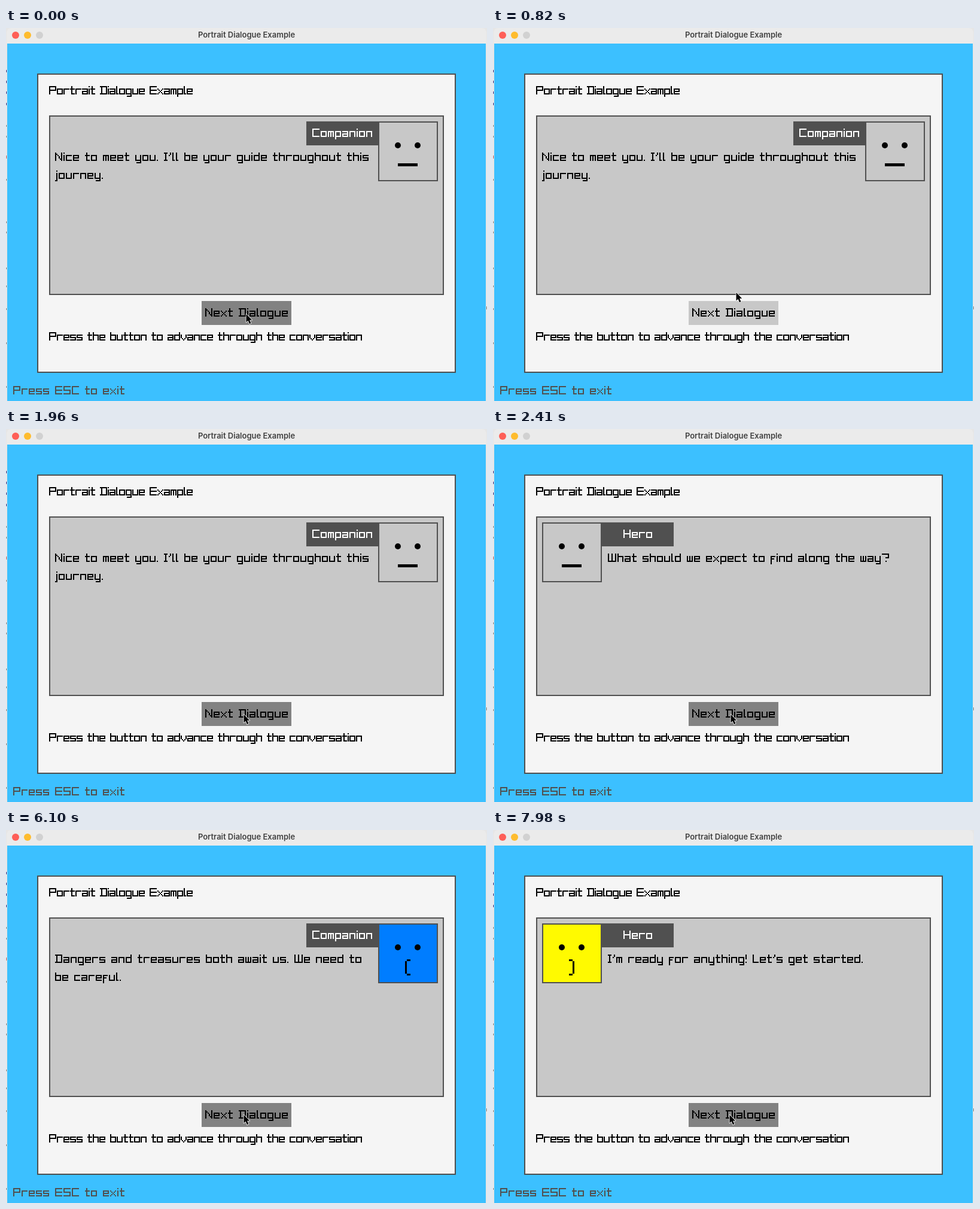
Animation of 804x623 px, one loop 8 s. Source, as an HTML page with a canvas:

```html
<!DOCTYPE html>
<html lang="en">
<head>
<meta charset="utf-8">
<title>Portrait Dialogue Example</title>
<style>
html, body { margin: 0; width: 100%; height: 100%; overflow: hidden; background: #fff; }
canvas { display: block; }
</style>
</head>
<body>
<canvas width="804" height="623" role="img" aria-label="Portrait Dialogue Example"></canvas>
<script>
const canvas = document.querySelector('canvas');
const ctx = canvas.getContext('2d');
const LOOP = 8000;
const DARK = '#505050', GREY = '#c8c8c8';

// Block lettering: strokes between grid points a to t, four per row:
// left edge, one unit in, middle, right edge.
const strokes = {
  a: 'ehpmil', b: 'amphe', c: 'hemp', d: 'dpmeh', e: 'ilhemp', f: 'heq ik',
  g: 'pmehtr', h: 'am ehp', i: 'a em', j: 'd htq', l: 'amp', m: 'mehp go',
  n: 'mehp', o: 'ehpme', p: 'qehpm', r: 'meh', s: 'heilpm', t: 'bnp eh',
  u: 'emph', v: 'eiolh', w: 'emph go', x: 'ep mh', y: 'emp htr',
  C: 'damp', D: 'adpm bn', E: 'damp il', H: 'am dp il', I: 'ad mp co',
  L: 'amp', N: 'am dp ap', P: 'madli', S: 'dailpm', W: 'ampd co',
  '.': 'm', "'": 'de', '!': 'ai m', '?': 'adlk o', ' ': ''
};
const special = { 1: '!.i', 2: "'jl", 3: ' I', 4: 'ft', 7: 'W' };

function units(ch) {
  const found = Object.keys(special).find(n => special[n].includes(ch));
  return found ? +found : /[a-zL]/.test(ch) ? 5 : 6;
}

function point(name, ch) {
  const i = name.charCodeAt(0) - 97, w = units(ch);
  const row = i >> 2;
  const raised = row === 2 && !/[a-z]/.test(ch);
  return [[0, 1, w >> 1, w - 1][i % 4], 1 + row * 2 - raised];
}

function glyph(ch, x, y) {
  for (const run of strokes[ch].split(' ').filter(Boolean)) {
    let [px, py] = point(run[0], ch);
    for (const name of run) {
      const [qx, qy] = point(name, ch);
      const n = Math.max(Math.abs(qx - px), Math.abs(qy - py));
      for (let k = 0; k <= n; k++) {
        const f = n ? k / n : 0;
        ctx.fillRect(x + 2 * Math.round(px + (qx - px) * f),
                     y + 2 * Math.round(py + (qy - py) * f), 2, 2);
      }
      [px, py] = [qx, qy];
    }
  }
}

function type(text, x, y, color = '#000', gap = 2) {
  ctx.fillStyle = color;
  for (const ch of text) {
    glyph(ch, x, y);
    x += units(ch) * 2 + gap;
  }
}

function typeCentered(text, cx, y, color) {
  const width = [...text].reduce((sum, ch) => sum + units(ch) * 2 + 2, -2);
  type(text, cx - width / 2, y, color);
}

function rect(x, y, w, h, color) {
  ctx.fillStyle = color;
  ctx.fillRect(x, y, w, h);
}

function box(x, y, w, h, color) {
  rect(x, y, w, h, DARK);
  rect(x + 2, y + 2, w - 4, h - 4, color);
}

function dot(x, y, r, color) {
  ctx.fillStyle = color;
  ctx.beginPath();
  ctx.arc(x, y, r, 0, 7);
  ctx.fill();
}

const scenes = [
  { from: 0, right: true, mood: 'calm',
    lines: ["Nice to meet you. I'll be your guide throughout this", 'journey.'] },
  { from: 2410, right: false, mood: 'calm',
    lines: ['What should we expect to find along the way?'] },
  { from: 4750, right: true, mood: 'sad',
    lines: ['Dangers and treasures both await us. We need to', 'be careful.'] },
  { from: 6900, right: false, mood: 'happy',
    lines: ["I'm ready for anything! Let's get started."] }
];
const faceColor = { calm: GREY, sad: '#007dff', happy: '#fffa00' };

function portrait(x, mood) {
  box(x, 156, 100, 100, faceColor[mood]);
  dot(x + 33, 196, 5, '#000');
  dot(x + 66, 196, 5, '#000');
  if (mood === 'calm') return rect(x + 33, 226, 33, 5, '#000');
  const sad = mood === 'sad';
  rect(x + (sad ? 45 : 51), 219, 3, 21, '#000');
  for (const y of [216, 240]) rect(x + (sad ? 48 : 45), y, 6, 3, '#000');
}

function dialogue({ right, mood, lines }) {
  portrait(right ? 622 : 82, mood);
  rect(right ? 502 : 182, 156, 120, 40, DARK);
  typeCentered(right ? 'Companion' : 'Hero', right ? 562 : 242, 166, '#fff');
  lines.forEach((line, i) => type(line, right ? 82 : 192, 206 + i * 30));
}

function pointer(t) {
  const between = (a, b, f) => Math.round(a + (b - a) * f);
  const stepped = (start, gap, steps) =>
    Math.min(1, (Math.floor((t - start) / gap) + 1) / steps);
  if (t < 570) return [401, 477];
  if (t < 1440) {
    const f = 1 - (1 - stepped(570, 83, 8)) ** 1.5;
    return [between(401, 409, f), between(477, 421, f)];
  }
  if (t < 6100) {
    const p = stepped(1440, 86, 7), f = p * p * (3 - 2 * p);
    return [between(409, 397, f), between(421, 476, f)];
  }
  return [t < 7530 ? 397 : t < 7980 ? 396 : 395, 475];
}

const arrow = new Path2D('M.5 .8V14.5L3.6 11.7 6 17.2 8.5 16.1 6.1 10.8H10.2Z');

function drawPointer(x, y) {
  ctx.save();
  ctx.translate(x, y);
  ctx.lineWidth = 1.6;
  ctx.lineJoin = 'round';
  ctx.strokeStyle = '#fff';
  ctx.stroke(arrow);
  ctx.fillStyle = '#000';
  ctx.fill(arrow);
  ctx.restore();
}

function windowFrame() {
  rect(0, 0, 804, 623, '#e6e6e6');
  for (const y of [70, 88, 106, 125]) rect(0, y, 1, 4, '#22227a');
  for (const y of [162, 180, 252, 323, 340, 400, 430, 468, 525, 598]) rect(0, y, 1, 3, '#777');
  rect(0, 213, 1, 5, '#b55');
  rect(803, 465, 1, 5, '#777');
  rect(2, 26, 800, 597, '#3cc0ff');
  ctx.fillStyle = '#ebebeb';
  ctx.beginPath();
  ctx.roundRect(1, 0, 802, 26, [8, 8, 0, 0]);
  ctx.fill();
  ['#fe5f57', '#febc2e', '#d1d1d1'].forEach((c, i) => dot(16 + i * 20, 12, 6, c));
  ctx.fillStyle = '#404040';
  ctx.font = '600 13px Inter, sans-serif';
  ctx.textAlign = 'center';
  ctx.fillText('Portrait Dialogue Example', 402, 16);
}

function draw(now) {
  const t = now % LOOP;
  const [x, y] = pointer(t);
  const hover = x >= 327 && x < 477 && y >= 456 && y < 496;

  windowFrame();
  box(52, 76, 700, 500, '#f5f5f5');
  type('Portrait Dialogue Example', 72, 95, '#000', 1);
  box(72, 146, 660, 300, GREY);
  dialogue(scenes.findLast(s => t >= s.from));
  rect(327, 456, 150, 40, hover ? '#828282' : GREY);
  typeCentered('Next Dialogue', 402, 466);
  type('Press the button to advance through the conversation', 72, 506, '#000', 1);
  type('Press ESC to exit', 12, 596, DARK);
  drawPointer(x, y);
}

const start = performance.now();
function tick() {
  draw(performance.now() - start);
  requestAnimationFrame(tick);
}
tick();
</script>
</body>
</html>
```
